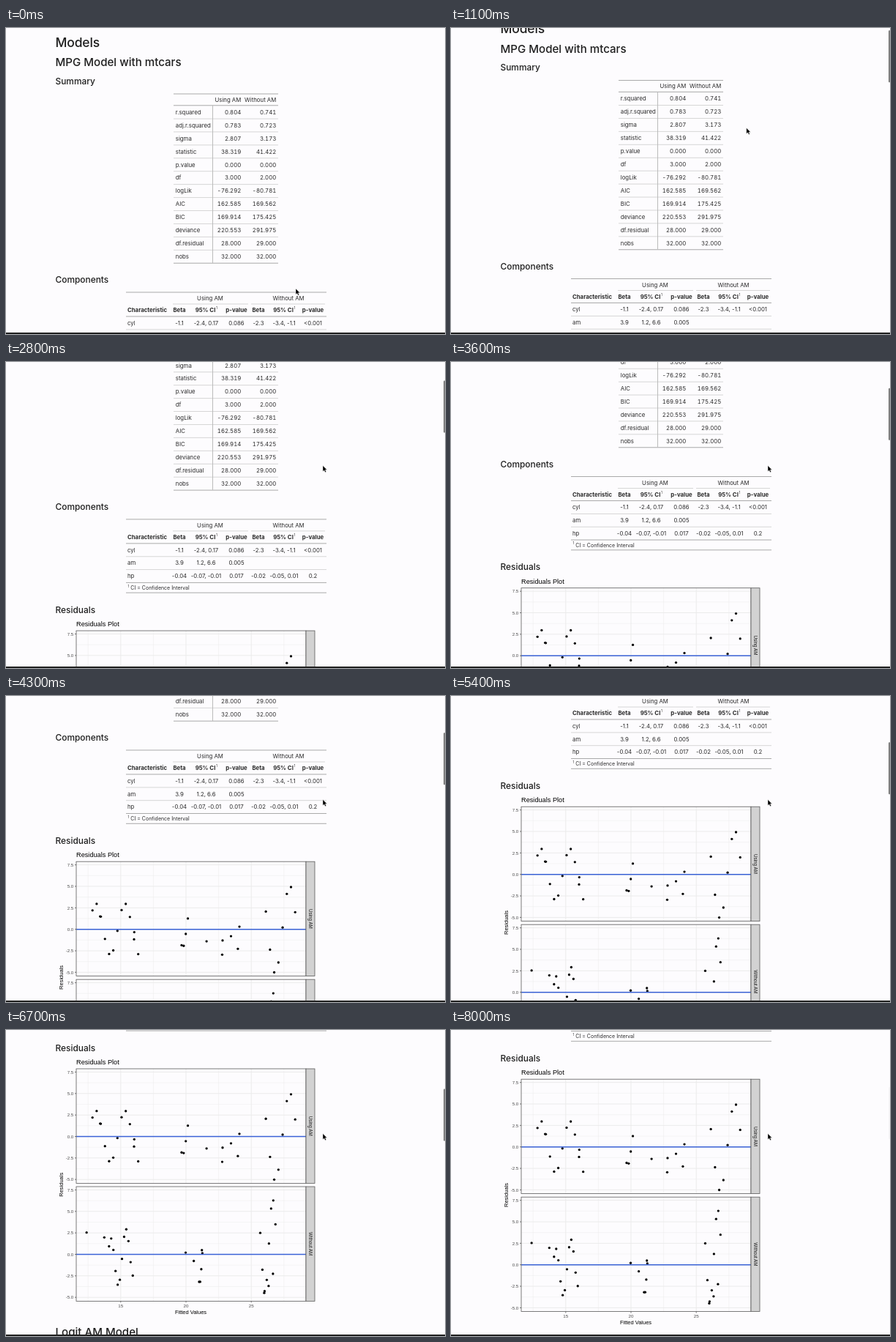
These frames come from a looping animation (600x418 px, 8.3 s). An HTML page:

```html
<!DOCTYPE html>
<html lang="en">
<head>
<meta charset="utf-8">
<title>Models</title>
<style>
html, body { margin: 0; width: 100%; height: 100%; overflow: hidden; background: #fdfcfe; }
svg { display: block; width: 600px; height: 418px; }
text { font: 7.8px Inter, "Open Sans", sans-serif; fill: #2b2b2b; }
.h1, .h2, .h3 { font-weight: 500; fill: #1e1e1e; }
.h1 { font-size: 17.5px; letter-spacing: -.01em; }
.h2 { font-size: 15.1px; }
.h3 { font-size: 11.9px; }
.num { font-variant-numeric: tabular-nums; }
.bold { font-weight: 700; }
.note { font-size: 7px; }
.sup { font-size: 4.5px; }
.plot, .axis, .tick, .strip { font-family: "Liberation Sans", Arial, sans-serif; fill: #000; }
.plot { font-size: 9.2px; }
.axis { font-size: 7.5px; }
.tick { font-size: 6.2px; fill: #4d4d4d; }
.strip { font-size: 6.3px; fill: #1a1a1a; }
</style>
</head>
<body>
<svg viewBox="0 0 600 418">
  <g id="page"></g>
  <rect id="thumb" x="598" width="3" height="71" rx="1" fill="#808080"/>
  <rect y="416" width="600" height="2" fill="#222"/>
  <path id="cursor" d="M0 0V8L1.9 6.4 3.2 9.2 4.6 8.6 3.3 5.8H5.7z" fill="#000" stroke="#fff" stroke-width=".4"/>
</svg>
<script>
const $ = id => document.getElementById(id);
const DARK = '#a9a9a9', LIGHT = '#d6d6d6';
let out = '';

// Text is placed by its vertical centre.
function text(str, x, y, cls = '', anchor = 'start', turn = 0) {
  const safe = String(str).replace('<', '&lt;');
  out += `<text class="${cls}" text-anchor="${anchor}" transform="translate(${x} ${y}) rotate(${turn})" y=".36em">${safe}</text>`;
}
function line(x1, y1, x2, y2, color = LIGHT, width = 1) {
  out += `<path d="M${x1} ${y1}L${x2} ${y2}" stroke="${color}" stroke-width="${width}"/>`;
}
function box(x, y, w, h, fill) {
  out += `<rect x="${x}" y="${y}" width="${w}" height="${h}" fill="${fill}" stroke="#5a5a5a" stroke-width=".8"/>`;
}

function summaryTable() {
  const rows = `r.squared 0.804 0.741
adj.r.squared 0.783 0.723
sigma 2.807 3.173
statistic 38.319 41.422
p.value 0.000 0.000
df 3.000 2.000
logLik -76.292 -80.781
AIC 162.585 169.562
BIC 169.914 175.425
deviance 220.553 291.975
df.residual 28.000 29.000
nobs 32.000 32.000`.split('\n');
  line(229, 90, 372, 90, DARK);
  text('Using AM', 321.3, 98, '', 'end');
  text('Without AM', 369.3, 98, '', 'end');
  line(229, 105.8, 372, 105.8, DARK);
  rows.forEach((row, i) => {
    const [name, a, b] = row.split(' '), y = 115 + i * 17.93;
    text(name, 231.8, y);
    text(a, 321.3, y, 'num', 'end');
    text(b, 369.3, y, 'num', 'end');
    line(229, y + 9, 372, y + 9, i < 11 ? LIGHT : DARK);
  });
  line(282.5, 106, 282.5, 321, '#bbb');
}

function componentTable() {
  const cols = [237, 273.5, 315, 345, 380, 419.5];
  const rows = ['cyl|-1.1|-2.4, 0.17|0.086|-2.3|-3.4, -1.1|<0.001',
    'am|3.9|1.2, 6.6|0.005', 'hp|-0.04|-0.07, -0.01|0.017|-0.02|-0.05, 0.01|0.2'];
  line(164, 361, 438, 361, DARK);
  text('Using AM', 279, 369.3, '', 'middle');
  text('Without AM', 386, 369.3, '', 'middle');
  line(228, 377, 331, 377);
  line(335, 377, 436, 377);
  text('Characteristic', 166, 385.5, 'bold');
  cols.forEach((x, i) => {
    const ci = i % 3 === 1;
    text(['Beta', '95% CI', 'p-value'][i % 3], ci ? x - 1 : x, 385.5, 'bold', 'middle');
    if (ci) text('1', x + 13.5, 382.5, 'sup');
  });
  line(164, 394, 438, 394, DARK);
  rows.forEach((row, i) => {
    const [name, ...cells] = row.split('|'), y = 403 + i * 17.8;
    text(name, 166, y);
    cells.forEach((c, j) => text(c, cols[j], y, '', 'middle'));
    line(164, y + 8.9, 438, y + 8.9, i < 2 ? LIGHT : DARK);
  });
  text('1', 166.5, 452, 'sup');
  text('CI = Confidence Interval', 170.3, 454.8, 'note');
  line(164, 461.3, 438, 461.3, DARK);
}

const withAm = (cyl, hp, am) => 30.888 - 1.127 * cyl - .03688 * hp + 3.904 * am;
const withoutAm = (cyl, hp) => 36.908 - 2.2647 * cyl - .01912 * hp;

// Each group of cars spreads evenly over its power range; mileage swings around the model.
const GROUPS = [
  { cyl: 4, am: 1, n: 8, hp: 52, hpMax: 113, swing: 5.1, phase: .4 },
  { cyl: 4, am: 0, n: 3, hp: 62, hpMax: 97, swing: 1.3, phase: 2.9 },
  { cyl: 6, am: 1, n: 3, hp: 110, hpMax: 175, swing: 3, phase: 4 },
  { cyl: 6, am: 0, n: 4, hp: 108, hpMax: 121, swing: 2.1, phase: 2.5 },
  { cyl: 8, am: 1, n: 2, hp: 264, hpMax: 335, swing: 2.2, phase: -.15 },
  { cyl: 8, am: 0, n: 12, hp: 150, hpMax: 245, swing: 3, phase: -1.3 }
];
const cars = GROUPS.flatMap(g => Array.from({ length: g.n }, (_, i) => {
  const hp = g.hp + (g.hpMax - g.hp) * i / (g.n - 1);
  const mpg = withAm(g.cyl, hp, g.am) + g.swing * Math.sin(.9 * i + g.phase);
  return { ...g, hp, mpg };
}));

function panel(top, label, fit) {
  const px = v => 246 + (v - 20) * 17.84, py = v => top + 92.5 - v * 11.74;
  const bottom = top + 156.4;
  for (let v = 12.5; v < 29; v += 2.5) line(px(v), top, px(v), bottom, '#ebebeb', v % 5 ? .5 : 1);
  for (let v = -5; v <= 7.5; v += 1.25) line(96, py(v), 410, py(v), '#ebebeb', v % 2.5 ? .5 : 1);
  for (let v = -5; v <= 7.5; v += 2.5) {
    text(v.toFixed(1), 92.3, py(v), 'tick', 'end');
    line(94, py(v), 96, py(v), '#555', .8);
  }
  for (const { cyl, hp, am, mpg } of cars) {
    const x = fit(cyl, hp, am);
    out += `<circle cx="${px(x)}" cy="${py(mpg - x)}" r="1.65"/>`;
  }
  line(96, py(0), 410, py(0), '#3a62d6', 1.4);
  box(96, top, 314, 156.4, 'none');
  box(410, top, 12, 156.4, '#d2d2d2');
  text(label, 416, top + 78.2, 'strip', 'middle', 90);
}

function residualPlot() {
  text('Residuals Plot', 96, 503.8, 'plot');
  panel(513.2, 'Using AM', withAm);
  panel(674.2, 'Without AM', withoutAm);
  for (let v = 15; v <= 25; v += 5) {
    const x = 246 + (v - 20) * 17.84;
    line(x, 830.6, x, 832.6, '#555', .8);
    text(v, x, 837, 'tick', 'middle');
  }
  text('Fitted Values', 252.5, 845.3, 'axis', 'middle');
  text('Residuals', 75, 671.5, 'axis', 'middle', -90);
}

text('Models', 67.5, 19.5, 'h1');
text('MPG Model with mtcars', 67.5, 47, 'h2');
text('Summary', 67.5, 72.5, 'h3');
summaryTable();
text('Components', 67.5, 344, 'h3');
componentTable();
text('Residuals', 67.5, 484.6, 'h3');
residualPlot();
text('Logit AM Model', 67.5, 873, 'h2');
$('page').innerHTML = out;

// Each flick of the wheel: start and end in ms, then the scroll position it slows down to.
const FLICKS = [[800, 1300, 22], [1400, 2300, 71.5], [2600, 3000, 171], [3500, 4000, 264],
  [4200, 4600, 316.6], [4700, 4900, 335], [5300, 5700, 396.7], [5800, 6300, 464], [6600, 7500, 446]];

const progress = (t, start, end) => Math.min(1, Math.max(0, (t - start) / (end - start)));
const easeOut = u => 1 - (1 - u) ** 2;

function draw() {
  const t = Math.min(8000, Math.floor(performance.now() % 8300 / 100) * 100);
  const scroll = FLICKS.reduce((y, [start, end, to]) => y + (to - y) * easeOut(progress(t, start, end)), 0);
  const up = progress(t, 0, 300), back = progress(t, 800, 1200);
  const x = 396 - 80 * up + 117 * back, y = 356 - 235 * up + 20.5 * back;
  $('page').setAttribute('transform', `translate(0 ${-scroll})`);
  $('thumb').setAttribute('y', scroll * .175);
  $('thumb').setAttribute('opacity', progress(t, 800, 900) - .94 * progress(t, 7800, 8000));
  $('cursor').setAttribute('transform', `translate(${x} ${y})`);
  requestAnimationFrame(draw);
}
draw();
</script>
</body>
</html>
```
